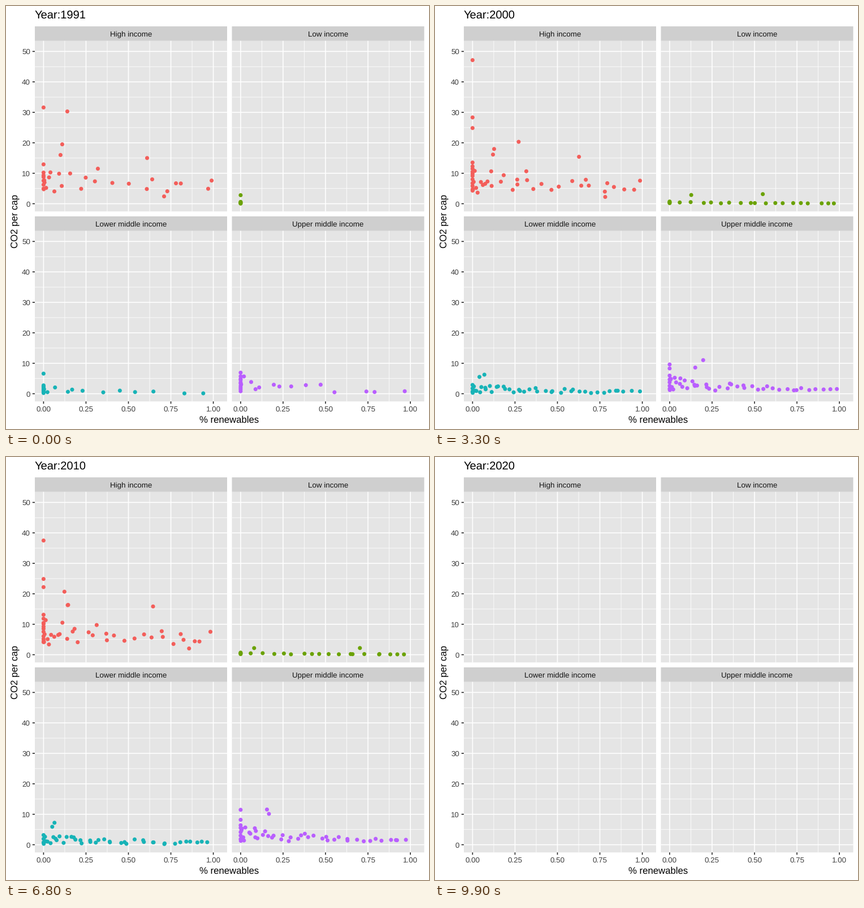
A matplotlib script that plays this animation: 748 px wide and 748 px high, repeating every 10 s.

```python
import numpy as np
import matplotlib.pyplot as plt
from matplotlib.animation import FuncAnimation
from matplotlib.patches import Rectangle

SIZE, DPI, FRAMES = 748, 100, 100
FIRST_YEAR, LAST_YEAR = 1991, 2020
YEARS = LAST_YEAR - FIRST_YEAR
SWITCH = 31  # many more countries report from here on
LAST = FRAMES - 3  # the points rest after this frame
PX = 72 / DPI
plt.rcParams["font.family"] = "Liberation Sans"
plt.rcParams["text.hinting"] = "none"
rng = np.random.default_rng(7)

HIGH, LOW, LOWER, UPPER = range(4)
NAMES = ["High income", "Low income", "Lower middle income", "Upper middle income"]
COLORS = ["#F35E5A", "#6BA204", "#17B3B7", "#B95EFF"]
LEFTS, TOPS = (51, 399.5), (36, 372)
WIDTH, STRIP, HEIGHT = 340, 25.6, 327.2
X_SCALE, Y_SCALE = 300.2, 5.385

EARLY, LATE, ALWAYS = (0, SWITCH - 1), (SWITCH, LAST), (0, LAST)
year_frames = np.rint(np.arange(YEARS) * (FRAMES - 1) / YEARS)
year_frames[-1] = LAST
groups = []


def origin(panel):
    """Pixel position of the data point (0, 0)."""
    return LEFTS[panel % 2] + 15.4, TOPS[panel // 2] + 313.6


def yearly(stack, frame):
    """Straight motion from one year's pose to the next."""
    pos = np.interp(frame, year_frames, np.arange(YEARS))
    i = min(int(pos), YEARS - 2)
    return stack[i] + (stack[i + 1] - stack[i]) * (pos - i)


def add_landmark(panel, span, start, end):
    """One outstanding country drifting from start to end."""
    start, end = np.array(start), np.array(end)

    def at(frame):
        progress = (min(frame, LAST) - span[0]) / (span[1] - span[0])
        return [start + (end - start) * progress]

    groups.append((panel, span, at))


def add_cloud(panel, span, zeros, spread, power, low, near, far, trend=1.0):
    """Countries at x = 0, then others thinning out up to x = 1."""
    u = (np.arange(spread) + rng.uniform(0.2, 0.8, spread)) / spread
    x = np.concatenate([np.zeros(zeros), u ** power])
    level = np.concatenate([(np.arange(zeros) + 0.5) / zeros,
                            rng.permutation(spread) / spread])
    y = low + level * (near + (far - near) * np.sqrt(x) - low)
    noise = rng.normal(size=(YEARS, zeros + spread, 2))

    def at(frame):
        dx, dy = yearly(noise, frame).T
        drift = 1 + (trend - 1) * min(frame, LAST) / LAST
        return np.column_stack([
            np.clip(x + 0.014 * dx * np.minimum(8 * x, 1), 0, 1),
            np.maximum(y * drift * (1 + 0.04 * dy), 0.05)])

    groups.append((panel, span, at))


add_landmark(HIGH, ALWAYS, (0, 31.6), (0, 22))
add_landmark(HIGH, ALWAYS, (0.61, 15), (0.66, 16.2))
add_landmark(HIGH, ALWAYS, (0.11, 19.5), (0.16, 15))
add_landmark(HIGH, ALWAYS, (0.10, 16), (0.16, 16.4))
add_landmark(HIGH, ALWAYS, (0.32, 11.5), (0.31, 9))
add_landmark(HIGH, ALWAYS, (0.64, 8), (0.72, 7.6))
add_landmark(HIGH, ALWAYS, (0.78, 6.7), (0.82, 6.8))
add_landmark(HIGH, ALWAYS, (0.71, 2.4), (0.92, 1.9))
add_landmark(HIGH, ALWAYS, (0.99, 7.6), (0.98, 7.5))
add_landmark(HIGH, EARLY, (0.14, 30.3), (0.20, 14))
add_landmark(HIGH, LATE, (0, 47.7), (0, 29.5))
add_landmark(HIGH, LATE, (0, 25), (0, 20))
add_landmark(HIGH, LATE, (0.28, 20.3), (0, 21))
add_landmark(LOW, EARLY, (0, 2.8), (0, 2.8))
add_landmark(LOW, LATE, (0.13, 2.9), (0.04, 1.6))
add_landmark(LOW, LATE, (0.54, 3.2), (0.83, 1.4))
add_landmark(LOWER, EARLY, (0, 6.6), (0.08, 6.8))
add_landmark(LOWER, LATE, (0.07, 6.2), (0.06, 8))
add_landmark(LOWER, LATE, (0.04, 5.5), (0.06, 6.2))
add_landmark(UPPER, LATE, (0.20, 11), (0.12, 12))
add_landmark(UPPER, LATE, (0.15, 8.5), (0.18, 11.4))
add_landmark(UPPER, LATE, (0, 9.5), (0, 13))
add_landmark(UPPER, LATE, (0, 8.3), (0, 8.1))

add_cloud(HIGH, EARLY, zeros=6, spread=20, power=2.8, low=4, near=13, far=6)
add_cloud(HIGH, LATE, zeros=9, spread=30, power=2.3, low=4, near=15, far=5, trend=0.85)
add_cloud(LOW, EARLY, zeros=4, spread=1, power=9, low=0.05, near=0.7, far=0.3)
add_cloud(LOW, LATE, zeros=4, spread=18, power=0.85, low=0.1, near=0.8, far=0.15)
add_cloud(LOWER, EARLY, zeros=9, spread=12, power=1.7, low=0.1, near=2.8, far=0.5)
add_cloud(LOWER, LATE, zeros=3, spread=40, power=1.5, low=0.2, near=3.2, far=1, trend=1.2)
add_cloud(UPPER, EARLY, zeros=10, spread=14, power=1.8, low=0.5, near=6.5, far=1.5)
add_cloud(UPPER, LATE, zeros=5, spread=42, power=1.7, low=1, near=6, far=1.4, trend=1.2)

fig = plt.figure(figsize=(SIZE / DPI, SIZE / DPI), dpi=DPI, facecolor="white")
ax = fig.add_axes([0, 0, 1, 1])
ax.set(xlim=(0, SIZE), ylim=(SIZE, 0))
ax.axis("off")


def line(xs, ys, color, width, z):
    ax.plot(xs, ys, color=color, lw=width * PX, solid_capstyle="butt", snap=False, zorder=z)


def grid_line(xs, ys, major):
    line(xs, ys, "white", 1.63 if major else 0.82, 3 if major else 2)


def box(x, y, w, h, color):
    ax.add_patch(Rectangle((x, y), w, h, fc=color, lw=0, snap=False, zorder=1))


def label(x, y, text, size, color="black", **kw):
    return ax.text(x, y, text, size=size * PX, color=color, va="baseline", zorder=6, **kw)


for panel, name in enumerate(NAMES):
    left, top = LEFTS[panel % 2], TOPS[panel // 2]
    right, body, bottom = left + WIDTH, top + STRIP, top + HEIGHT
    x0, y0 = origin(panel)
    box(left, body, WIDTH, bottom - body, "#E5E5E5")
    box(left, top, WIDTH, STRIP, "#CFCFCF")
    label((left + right) / 2, top + 18, name, 13.44, "#141414", ha="center")
    for i in range(11):
        y, major = y0 - 5 * i * Y_SCALE, i % 2 == 0
        grid_line([left, right], [y, y], major)
        if major and panel % 2 == 0:
            line([left - 4.2, left], [y, y], "#282828", 1.63, 4)
            label(43, y + 4.9, str(5 * i), 13.44, "#404040", ha="right")
    for i in range(9):
        x, major = x0 + i / 8 * X_SCALE, i % 2 == 0
        grid_line([x, x], [body, bottom], major)
        if major and panel >= 2:
            line([x, x], [bottom, bottom + 4.2], "#282828", 1.63, 4)
            label(x, 717, f"{i / 8:.2f}", 13.44, "#404040", ha="center")

label(395, 736.5, "% renewables", 16.8, ha="center")
label(21, 381, "CO2 per cap", 16.8, ha="center", rotation=90, rotation_mode="anchor")
title = label(51, 23, "", 20.17)
dots = ax.scatter([], [], s=(7.06 * PX) ** 2, linewidths=0, zorder=5)


def update(frame):
    year = FIRST_YEAR + frame * YEARS // (FRAMES - 1)
    title.set_text(f"Year:{year}")
    offsets, colors = [np.empty((0, 2))], []
    for panel, (first, last), at in groups:
        visible = first <= frame and (frame <= last or last == LAST)
        if visible and year < LAST_YEAR:
            points = np.array(at(frame))
            offsets.append(origin(panel) + points * (X_SCALE, -Y_SCALE))
            colors += [COLORS[panel]] * len(points)
    dots.set_offsets(np.vstack(offsets))
    dots.set_facecolors(colors or "none")
    return title, dots


anim = FuncAnimation(fig, update, frames=FRAMES, interval=100, repeat=True, repeat_delay=0)
plt.show()
```
